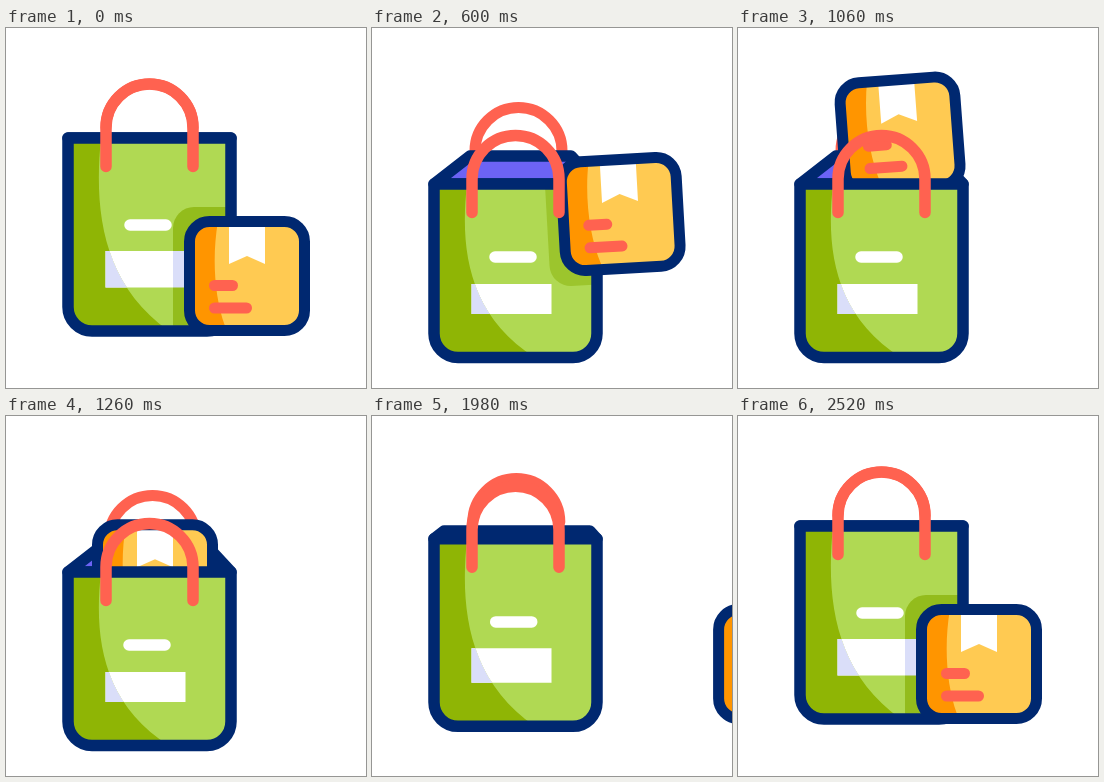
These frames come from a looping animation (360x360 px, 3100 ms). An HTML page with a canvas:

```html
<!DOCTYPE html>
<html lang="en">
<head>
<meta charset="utf-8">
<title>Shopping bag</title>
<style>
  html, body { margin: 0; width: 100%; height: 100%; overflow: hidden; background: #fff; }
  canvas { display: block; width: 360px; height: 360px; }
</style>
</head>
<body>
<canvas id="stage"></canvas>
<script>
const LOOP = 3100;
const NAVY = '#002870', RED = '#ff6250', YELLOW = '#ffca52', ORANGE = '#ff9500';
const GREEN = '#b0d953', DARK = '#8fb505', SHADE = '#93bc1c', PURPLE = '#6c63f5', LILAC = '#dadef9';

const canvas = document.getElementById('stage');
const c = canvas.getContext('2d');
const dpr = window.devicePixelRatio || 1;
canvas.width = canvas.height = 360 * dpr;

const mix = (a, b, k) => a + (b - a) * k;
const part = (t, a, b) => Math.min(1, Math.max(0, (t - a) / (b - a)));
const ease = (t, a, b) => (1 - Math.cos(Math.PI * part(t, a, b))) / 2;

// time, x, y, degrees
const HOP = [
  [430, 241, 248, 0],
  [600, 248.7, 186.5, -3.2],
  [740, 246, 98, -9],
  [830, 228, 78, -11.2],
  [880, 213.5, 80.3, -11.7],
  [1070, 161, 108, -4],
  [1260, 149, 163, 0],
  [1460, 149, 222, 0]
];
const SWAP = 810, GONE = 1460, RETURN = 1840;

function slope(i, col) {
  const a = HOP[i - 1], b = HOP[i], d = HOP[i + 1];
  if (!a || !d) return 0;
  const p = (b[col] - a[col]) / (b[0] - a[0]);
  const q = (d[col] - b[col]) / (d[0] - b[0]);
  return p * q > 0 ? 2 * p * q / (p + q) : 0;
}

// Monotone cubic through the hop points
function hop(t, col) {
  const last = HOP.length - 1;
  if (t <= HOP[0][0]) return HOP[0][col];
  if (t >= HOP[last][0]) return HOP[last][col];
  let i = 0;
  while (HOP[i + 1][0] < t) i++;
  const a = HOP[i], b = HOP[i + 1], h = b[0] - a[0], k = (t - a[0]) / h;
  const k2 = k * k, k3 = k2 * k;
  return (2 * k3 - 3 * k2 + 1) * a[col] + (k3 - 2 * k2 + k) * h * slope(i, col)
       + (3 * k2 - 2 * k3) * b[col] + (k3 - k2) * h * slope(i + 1, col);
}

function boxPose(t) {
  if (t < GONE) {
    return {
      x: hop(t, 1), y: hop(t, 2), r: hop(t, 3) * Math.PI / 180,
      shade: 1 - part(t, 500, SWAP)
    };
  }
  if (t < RETURN) return null;
  return { x: 241 + 182 * (1 - ease(t, RETURN, 2515)), y: 248, r: 0, shade: 1 };
}

function fill(path, color) {
  c.fillStyle = color;
  c.fill(path);
}

function stroke(path, color, width) {
  c.strokeStyle = color;
  c.lineWidth = width;
  c.stroke(path);
}

function line(x1, y1, x2, y2, color, width) {
  stroke(new Path2D(`M${x1} ${y1}L${x2} ${y2}`), color, width);
}

function round(x, y, w, h, r) {
  const p = new Path2D();
  p.roundRect(x, y, w, h, r);
  return p;
}

function within(path, draw) {
  c.save();
  c.clip(path);
  draw();
  c.restore();
}

const boxBody = round(-57.5, -54.5, 115, 109, 20);
const boxSide = new Path2D('M-60 -55H-29C-35 -20 -33 20 -22 50V55H-60Z');
const ribbon = new Path2D('M-18 -50H18V-12L0 -20L-18 -12Z');
const boxShadow = round(-74, -69, 148, 138, 21);

function place(pose) {
  c.translate(pose.x, pose.y);
  c.rotate(pose.r);
}

function drawBox(pose) {
  c.save();
  place(pose);
  fill(boxBody, YELLOW);
  within(boxBody, () => fill(boxSide, ORANGE));
  fill(ribbon, '#fff');
  line(-32.5, 9.5, -14.5, 9.5, RED, 11);
  line(-32.5, 32, -.5, 32, RED, 11);
  stroke(boxBody, NAVY, 11);
  c.restore();
}

function drawBack(open) {
  const cx = mix(143.5, 146.5, open), cy = mix(99.5, 123, open);
  const top = mix(110, 128, open), front = mix(110, 156, open);
  const arch = new Path2D();
  arch.arc(cx, cy, 43.5, Math.PI, 0);
  stroke(arch, RED, 11);
  const rim = new Path2D(
    `M62 ${front}L${mix(62, 98, open)} ${top}H${mix(225, 199, open)}L225 ${front}Z`);
  fill(rim, PURPLE);
  stroke(rim, NAVY, 11.5);
}

function drawFront(open, shadow) {
  const top = mix(110, 156, open), base = mix(303, 329.5, open);
  const body = round(62, top, 163, base - top, [0, 0, 24, 24]);
  const at = k => mix(top, base, k);
  const curve = new Path2D(
    `M60 ${top}H95C88 ${at(.36)} 95 ${at(.75)} 163 ${base}H60Z`);
  const label = new Path2D();
  label.rect(99.5, mix(223, 256, open), 80, mix(36.5, 30, open));

  fill(body, GREEN);
  fill(label, '#fff');
  within(body, () => {
    fill(curve, DARK);
    within(curve, () => {
      fill(label, '#fff');
      fill(label, LILAC);
    });
    if (shadow) {
      c.save();
      c.globalAlpha = shadow.shade;
      place(shadow);
      fill(boxShadow, SHADE);
      c.clip(boxShadow);
      c.rotate(-shadow.r);
      c.translate(-shadow.x, -shadow.y);
      fill(label, LILAC);
      c.restore();
    }
  });
  const pill = mix(197, 229, open), px = mix(124, 123, open);
  line(px, pill, px + 36, pill, '#fff', 11.5);
  stroke(body, NAVY, 11.5);
}

function drawHandle(open) {
  const cy = mix(99.5, 151, open), end = mix(138.5, 184.5, open);
  const handle = new Path2D();
  handle.moveTo(100, end);
  handle.arc(143.5, cy, 43.5, Math.PI, 0);
  handle.lineTo(187, end);
  stroke(handle, RED, 11.5);
}

const SPARKS = [[216, 85, 218, 72], [235.5, 101, 248, 88], [251, 120, 263, 118.5]];

function drawSparks(t) {
  const head = ease(t, 2050, 2170), tail = ease(t, 2200, 2330);
  if (head === 0 || tail === 1) return;
  for (const [x1, y1, x2, y2] of SPARKS) {
    line(mix(x1, x2, tail), mix(y1, y2, tail), mix(x1, x2, head), mix(y1, y2, head),
      YELLOW, 10.5 * Math.min(1, head * 3, (1 - tail) * 3));
  }
}

function draw() {
  const t = performance.now() % LOOP;
  const open = ease(t, 220, 520) - ease(t, 1800, 2080);
  const box = boxPose(t);
  const inside = t > SWAP && t < GONE;

  c.setTransform(dpr, 0, 0, dpr, 0, 0);
  c.fillStyle = '#fff';
  c.fillRect(0, 0, 360, 360);
  c.lineCap = c.lineJoin = 'round';

  drawBack(open);
  if (box && inside) drawBox(box);
  drawFront(open, inside ? null : box);
  drawSparks(t);
  if (box && !inside) drawBox(box);
  drawHandle(open);
  requestAnimationFrame(draw);
}
draw();
</script>
</body>
</html>
```
